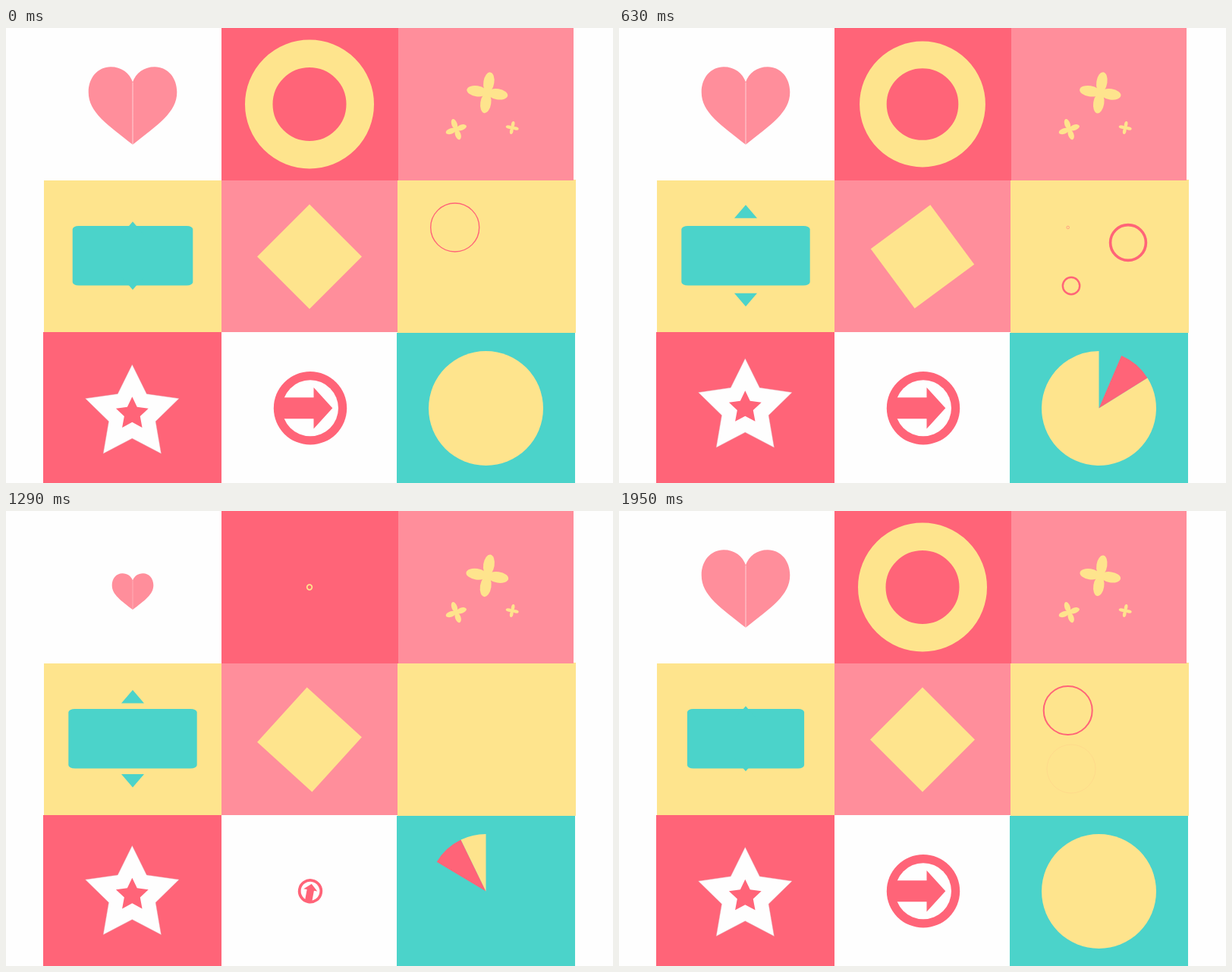
An HTML page with a canvas for the animation above (1980 ms loop, 800 by 600 pixels).

```html
<!DOCTYPE html>
<html lang="en">
<head>
<meta charset="utf-8">
<title>Shape tiles</title>
<style>
html, body { margin: 0; width: 100%; height: 100%; overflow: hidden; background: #fefefe; }
canvas { display: block; width: 800px; height: 600px; }
</style>
</head>
<body>
<canvas id="stage" width="800" height="600"></canvas>
<script>
const ctx = document.getElementById('stage').getContext('2d');
const LOOP = 1980, STEP = 30, CYCLE = 990, HALF = 495, TAU = 2 * Math.PI;
const WHITE = '#fefefe', PINK = '#ff6478', ROSE = '#ff8e9b', YELLOW = '#fee48d', TEAL = '#4bd3ca';

// Left, top, right, bottom.
const tiles = [
  [516, 200, 751, 402, YELLOW],
  [284, 0, 517, 201, PINK],
  [517, 0, 748, 201, ROSE],
  [50, 201, 284, 401, YELLOW],
  [284, 201, 516, 401, ROSE],
  [49, 401, 284, 600, PINK],
  [515, 402, 750, 600, TEAL]
];

const clamp = x => Math.max(0, Math.min(1, x));
const easeOut = (x, n) => 1 - Math.pow(1 - clamp(x), n);
const easeInOut = x => (1 - Math.cos(Math.PI * clamp(x))) / 2;
const sweep = (x, delay) => easeOut(Math.pow(clamp(x), delay), 3);

function bounce(x) {
  x = clamp(x);
  const k = 7.5625, d = 2.75;
  if (x < 1 / d) return k * x * x;
  if (x < 2 / d) return k * (x - 1.5 / d) ** 2 + 0.75;
  if (x < 2.5 / d) return k * (x - 2.25 / d) ** 2 + 0.9375;
  return k * (x - 2.625 / d) ** 2 + 0.984375;
}

// Milliseconds since the latest `start` in a repeating cycle.
const since = (t, period, start) => (t - start + 2 * period) % period;

function at(x, y, scale, degrees, draw) {
  ctx.save();
  ctx.translate(x, y);
  ctx.rotate(degrees * Math.PI / 180);
  ctx.scale(scale, scale);
  draw();
  ctx.restore();
}

function poly(points, color) {
  ctx.beginPath();
  points.forEach(([x, y]) => ctx.lineTo(x, y));
  ctx.closePath();
  ctx.fillStyle = color;
  ctx.fill();
}

function disc(r, color) {
  ctx.beginPath();
  ctx.arc(0, 0, r, 0, TAU);
  ctx.fillStyle = color;
  ctx.fill();
}

function hoop(r, width, color) {
  ctx.beginPath();
  ctx.arc(0, 0, r, 0, TAU);
  ctx.lineWidth = width;
  ctx.strokeStyle = color;
  ctx.stroke();
}

function heart(t) {
  at(167, 109.5, easeOut(since(t, CYCLE, 255) / 166, 2), 0, () => {
    ctx.beginPath();
    for (const k of [-1, 1]) {
      ctx.moveTo(-k * 0.3, -37.5);
      ctx.bezierCurveTo(k * 4, -50.5, k * 15, -58.3, k * 29, -58.3);
      ctx.bezierCurveTo(k * 46, -58.3, k * 58.3, -44, k * 58.3, -25);
      ctx.bezierCurveTo(k * 58.3, 2, k * 33, 18, -k * 0.3, 44.5);
    }
    ctx.fillStyle = ROSE;
    ctx.fill('nonzero');
  });
}

function ring(t) {
  at(400, 100.5, bounce(since(t, CYCLE, 260) / HALF), 0, () => hoop(66.75, 36.5, YELLOW));
}

function sparkle(x, y, size, degrees) {
  at(x, y, size, degrees, () => {
    ctx.fillStyle = YELLOW;
    for (let i = 0; i < 4; i++) {
      ctx.beginPath();
      ctx.ellipse(0, -13.7, 7, 13.3, 0, 0, TAU);
      ctx.fill();
      ctx.rotate(Math.PI / 2);
    }
    disc(6.5, YELLOW);
  });
}

function sparkles(t) {
  sparkle(634.3, 85.3, 1.02 + 0.022 * Math.cos((t - 350) / CYCLE * TAU), 8.5);
  sparkle(593.3, 133.6, 0.53, -19);
  sparkle(667.2, 131.5, 0.32, 12);
}

function speech(t) {
  const u = since(t, HALF, 10);
  const sag = u < 228 ? 0 : Math.sin(Math.PI / 2 * ((u - 228) / 229) ** 2);
  const stretch = easeOut(u / 125, 2) - 0.09 * sag ** 4;
  const tip = 28 + 39 * easeOut((u - 40) / 85, 2) - 24 * sag;
  at(167, 300.2, 1, 0, () => {
    ctx.save();
    ctx.scale(stretch, 1);
    ctx.beginPath();
    ctx.roundRect(-84.7, -39.3, 169.4, 78.6, { x: 8.5, y: 4.5 });
    ctx.fillStyle = TEAL;
    ctx.fill();
    ctx.restore();
    if (tip < 39) return;
    for (const k of [-1, 1]) poly([[0, k * tip], [15, k * (tip - 17.5)], [-15, k * (tip - 17.5)]], TEAL);
  });
}

function diamond(t) {
  at(400, 301.5, 1, 90 * easeInOut(since(t, HALF, 87) / 240), () =>
    poly([[0, -69], [69, 0], [0, 69], [-69, 0]], YELLOW));
}

function bubble(t, x, y, start) {
  const u = since(t, CYCLE, start), left = 1 - u / 485;
  if (left <= 0) return;
  const s = easeInOut(u / 375);
  at(x, y, 1, 0, () => hoop(32 * s, 10 * s * left, PINK));
}

function bubbles(t) {
  bubble(t, 671, 283, 385);
  bubble(t, 596, 340, 479);
  bubble(t, 591.7, 263, 573);
}

function starPoints(outer, inner) {
  return Array.from({ length: 10 }, (_, i) => {
    const a = i * Math.PI / 5, r = i % 2 ? inner : outer;
    return [r * Math.sin(a), -r * Math.cos(a)];
  });
}

function star(t) {
  const y = 505 - 4.5 * Math.cos((t - 590) / CYCLE * TAU);
  at(166.3, y, 1, 0, () => {
    poly(starPoints(65, 32.5), WHITE);
    ctx.lineWidth = 0.8;
    ctx.strokeStyle = 'rgba(225,150,162,.55)';
    ctx.stroke();
    poly(starPoints(22.5, 11), PINK);
  });
}

function arrow(t) {
  const s = easeOut(since(t, CYCLE, 253) / 369, 3);
  at(401, 501.3, s, -120 * (1 - s), () => {
    disc(48.2, PINK);
    disc(37, WHITE);
    poly([[-42, -14], [4.5, -14], [4.5, -27.3], [29.3, 0], [4.5, 27.3], [4.5, 14], [-42, 14]], PINK);
  });
}

// Angles run clockwise from twelve o'clock.
function slice(from, to, color) {
  if (to - from < 0.05) return;
  const rad = d => (d - 90) * Math.PI / 180;
  ctx.beginPath();
  if (to - from < 359.9) ctx.moveTo(0, 0);
  ctx.arc(0, 0, 75.5, rad(from), rad(to));
  ctx.closePath();
  ctx.fillStyle = color;
  ctx.fill();
}

function pie(t) {
  const u = since(t, CYCLE, 245);
  const lead = 360 * (1 - sweep(u / 590, 1.2)), tail = 360 * (1 - sweep(u / 650, 1.5));
  at(632.5, 501.5, 1, 0, () => {
    slice(lead, tail, PINK);
    slice(tail, 360, YELLOW);
  });
}

const parts = [heart, ring, sparkles, speech, diamond, bubbles, star, arrow, pie];

function draw(t) {
  ctx.fillStyle = WHITE;
  ctx.fillRect(0, 0, 800, 600);
  for (const [x0, y0, x1, y1, color] of tiles) {
    ctx.fillStyle = color;
    ctx.fillRect(x0, y0, x1 - x0, y1 - y0);
  }
  parts.forEach(part => part(t));
}

const begin = performance.now();
function tick() {
  const t = (performance.now() - begin) % LOOP;
  draw(Math.floor(t / STEP) * STEP);
  requestAnimationFrame(tick);
}
tick();
</script>
</body>
</html>
```
